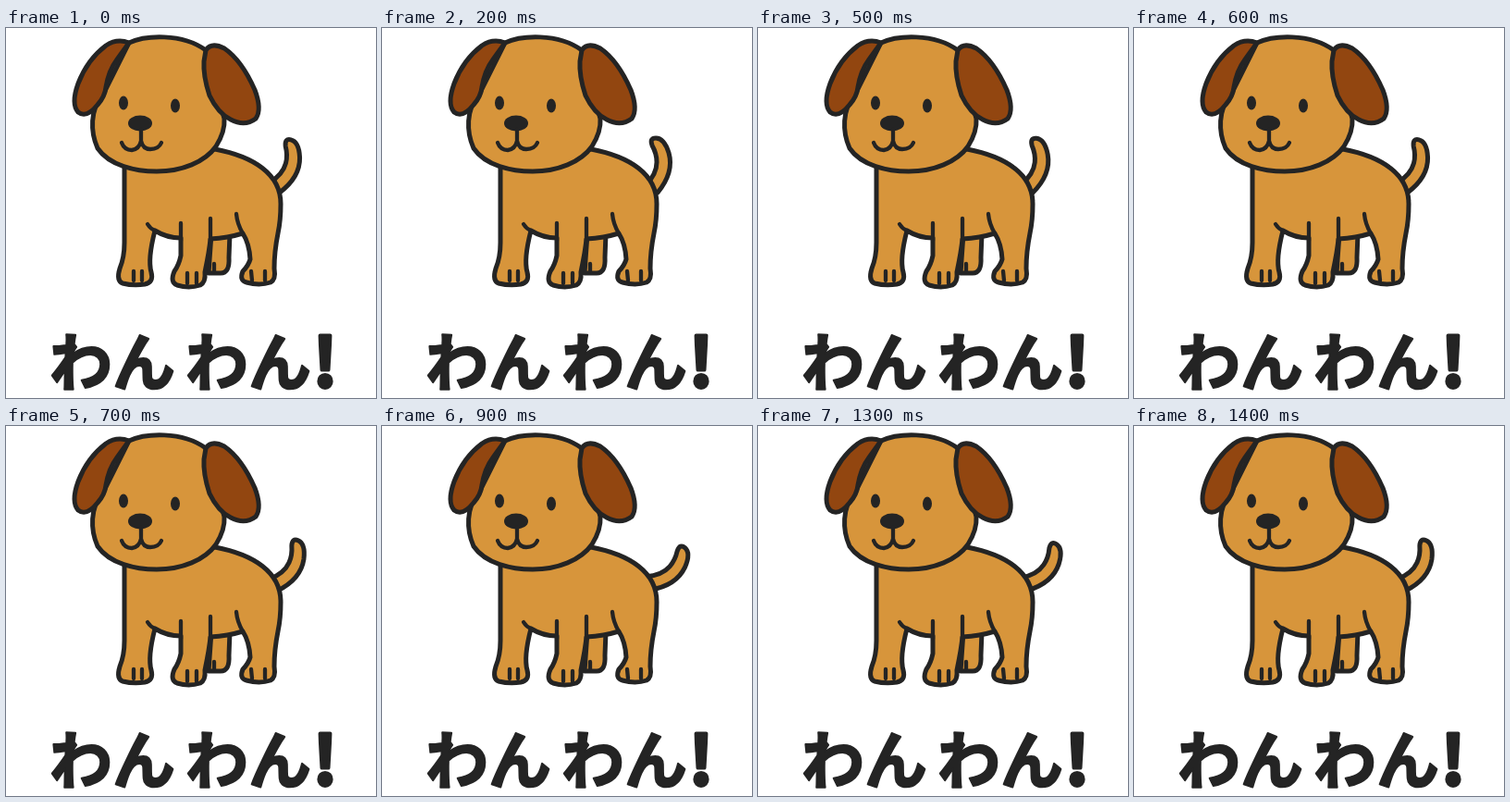
These frames come from a looping animation (400 by 400 pixels, 1.5 s). An HTML page:

```html
<!DOCTYPE html>
<html lang="ja">
<head>
<meta charset="utf-8">
<style>
  html, body { margin: 0; width: 100%; height: 100%; overflow: hidden; background: #fff; }
  svg { display: block; width: 100vw; height: 100vh; }
  .ink { stroke: #242424; stroke-width: 5; stroke-linecap: round; stroke-linejoin: round; }
  .fur { fill: #d7953b; }
  .ear { fill: #924610; }
  .line { fill: none; }
  .thin { stroke-width: 4.3; }
  .dark { fill: #242424; }
  text {
    font: 700 68px "Noto Sans CJK JP", "Noto Sans CJK", sans-serif;
    fill: #242424; stroke: #242424; stroke-width: 2; stroke-linejoin: round;
  }
  .bang { font-size: 73px; text-anchor: middle; stroke-width: 4; }
</style>
</head>
<body>
<svg viewBox="0 0 400 400">
  <path id="tail" class="ink fur" d="M285 170 Q297 158 297 145 Q297 136 292 127 Q289 119 296 119 Q305 119 310 135 Q316 156 298 178 Z"/>

  <!-- far hind leg -->
  <path class="ink fur" d="M222 222 L242 222 L241 248 Q242 265 232 265 L219 265 Z"/>
  <path class="ink line thin" d="M225 255 L225 263"/>

  <!-- body and near legs -->
  <path class="ink fur" d="M128 150 L128 232 Q128 248 123 260 Q119 273 126 276 Q138 279 150 277 Q160 275 157 264 Q153 250 161 219
    Q174 227 189 227 L189 246 Q187 256 182 263 Q177 275 185 278 Q198 282 210 278 Q216 275 215 264 Q220 240 221 228
    Q240 227 256 222 Q263 233 264 250 Q262 257 256 263 Q252 273 260 275 Q274 279 286 275 Q292 272 290 260
    Q290 242 294 222 Q297 208 297 190 C297 158 268 139 226 131 Z"/>
  <path class="ink line thin" d="M153 212 Q156 217 161 219 M189 211 V230 M221 206 V230 M249 201 Q250 212 256 222"/>
  <path class="ink line thin" d="M138 263 V273 M147 263 V273 M196 265 V276 M206 265 V276 M265 263 L266 273 M280 263 V273"/>

  <!-- head -->
  <path class="ink fur" d="M133 16 C150 8 190 5 216 24 L236 98 Q237 112 227 128 C215 145 190 155 163 155 C140 155 112 149 99 130 C91 112 91 88 104 74 Z"/>
  <path class="ink ear" d="M133 16 Q120 11 108 19 Q88 34 78 60 Q70 82 78 91 Q87 98 99 83 Q107 74 108 64 Q111 46 120 34 Z"/>
  <path class="ink ear" d="M216 24 Q222 15 236 22 Q255 35 269 67 Q277 88 270 98 Q258 107 243 99 Q229 92 220 73 Q213 52 214 36 Z"/>
  <ellipse class="dark" cx="127" cy="81" rx="5" ry="7.5"/>
  <ellipse class="dark" cx="183" cy="84" rx="5" ry="7.5"/>
  <ellipse class="dark" cx="145" cy="103" rx="13" ry="8.5"/>
  <path class="ink line thin" d="M146 110 V122 M125 124 Q128 132 136 132 Q144 131 146 122 Q148 131 156 131 Q165 131 168 124"/>

  <text x="47" y="387">わん</text>
  <text x="194" y="387">わん</text>
  <text class="bang" x="345" y="388">!</text>
</svg>
<script>
  const LOOP = 1500, STEP = 100;
  const tail = document.getElementById("tail");

  function draw(now) {
    const t = Math.floor((now % LOOP) / STEP) * STEP;
    const angle = 22 - 24 * Math.cos(2 * Math.PI * (t - 300) / LOOP);
    tail.setAttribute("transform", `rotate(${angle.toFixed(2)} 295 167)`);
  }

  const start = performance.now();
  function tick() {
    draw(performance.now() - start);
    requestAnimationFrame(tick);
  }
  tick();
</script>
</body>
</html>
```
